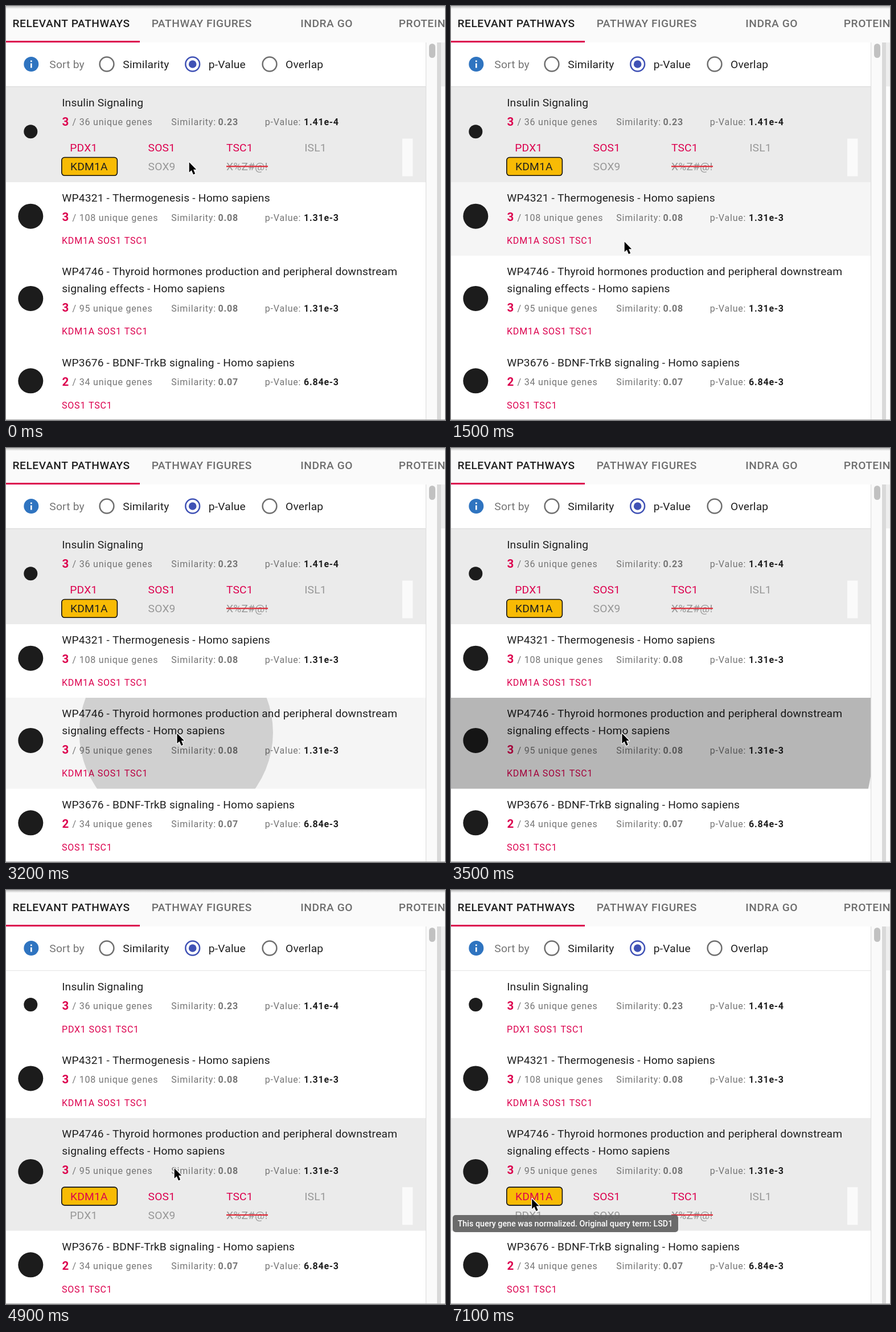
An HTML page with a canvas for the animation above (8 s loop, 771 by 726 pixels).

```html
<!DOCTYPE html>
<html lang="en">
<head>
<meta charset="utf-8">
<title>Relevant pathways</title>
<style>
html, body { margin: 0; width: 100%; height: 100%; overflow: hidden; background: #fff; }
canvas { display: block; }
</style>
</head>
<body>
<canvas id="stage" width="771" height="726"></canvas>
<script>
const ctx = document.getElementById('stage').getContext('2d');
const LOOP = 8000, STEP = 100, SELECT_AT = 3600;
const INK = '#1f1f1f', GREY = '#757575', PALE = '#979797', PINK = '#dc004e', BLUE = '#3f51b5';

const pathways = [
  { title: ['Insulin Signaling'], hits: 3, total: 36, sim: '0.23', p: '1.41e-4',
    genes: 'PDX1 SOS1 TSC1', grid: 'PDX1 SOS1 TSC1 ISL1 KDM1A SOX9 X%Z#@!', chipColor: INK, dot: 12 },
  { title: ['WP4321 - Thermogenesis - Homo sapiens'], hits: 3, total: 108, sim: '0.08', p: '1.31e-3',
    genes: 'KDM1A SOS1 TSC1', dot: 22 },
  { title: ['WP4746 - Thyroid hormones production and peripheral downstream',
            'signaling effects - Homo sapiens'], hits: 3, total: 95, sim: '0.08', p: '1.31e-3',
    genes: 'KDM1A SOS1 TSC1', grid: 'KDM1A SOS1 TSC1 ISL1 PDX1 SOX9 X%Z#@!', chipColor: PINK, dot: 22 },
  { title: ['WP3676 - BDNF-TrkB signaling - Homo sapiens'], hits: 2, total: 34, sim: '0.07', p: '6.84e-3',
    genes: 'SOS1 TSC1', dot: 22 }
];

// time, x, y of the pointer tip
const pointerPath = [
  [1000, 321, 273.5], [1400, 305, 408], [1500, 304, 413], [1700, 304, 425], [2000, 300.5, 490],
  [2100, 300, 498], [2300, 300, 500], [4400, 299.5, 500], [4700, 298, 493], [4800, 298, 493],
  [4900, 295, 487.5], [5100, 269, 472], [5200, 269, 472], [5700, 178, 500], [6100, 130, 521], [6200, 141.5, 541]
];

const clamp = v => Math.min(1, Math.max(0, v));
const ramp = (t, start, length) => clamp((t - start) / length);

// cubic-bezier(.4, 0, .2, 1)
function ease(x) {
  let lo = 0, hi = 1;
  for (let i = 0; i < 20; i++) {
    const s = (lo + hi) / 2, r = 1 - s;
    if (1.2 * r * r * s + 0.6 * r * s * s + s * s * s < x) lo = s; else hi = s;
  }
  return lo * lo * (3 - 2 * lo);
}

function rect(x, y, w, h, color) {
  ctx.fillStyle = color;
  ctx.fillRect(x, y, w, h);
}

function roundRect(x, y, w, h, r, fill, stroke) {
  ctx.beginPath();
  ctx.roundRect(x, y, w, h, r);
  ctx.fillStyle = fill;
  ctx.fill();
  if (stroke) {
    ctx.strokeStyle = stroke;
    ctx.lineWidth = 1.6;
    ctx.stroke();
  }
}

function circle(x, y, r, fill, stroke) {
  ctx.beginPath();
  ctx.arc(x, y, r, 0, Math.PI * 2);
  if (fill) { ctx.fillStyle = fill; ctx.fill(); }
  if (stroke) { ctx.strokeStyle = stroke; ctx.lineWidth = 2.5; ctx.stroke(); }
}

function text(str, x, y, color = INK, size = 19.2, weight = 400, spacing = 0.2) {
  ctx.font = `${weight} ${size}px Roboto, sans-serif`;
  ctx.letterSpacing = spacing + 'px';
  ctx.fillStyle = color;
  ctx.fillText(str, x, y);
}
const small = (str, x, y, color = GREY, weight = 400) => text(str, x, y, color, 16, weight, 0.8);

function drawHeader() {
  rect(0, 0, 771, 64, '#fafafa');
  const shade = ctx.createLinearGradient(0, 0, 0, 5);
  shade.addColorStop(0, '#bdbdbd');
  shade.addColorStop(1, '#fafafa');
  rect(0, 0, 771, 5, shade);
  [['RELEVANT PATHWAYS', 11.5], ['PATHWAY FIGURES', 255.7], ['INDRA GO', 517.3], ['PROTEIN', 689.8]]
    .forEach(([label, x], i) => text(label, x, 37.4, i ? '#6e6e6e' : INK, 19.2, 500, 0.55));
  rect(0, 61, 235, 3, PINK);

  circle(44.3, 102, 13, '#2f74c0');
  rect(43, 100.5, 2.6, 8, '#fff');
  rect(43, 95.5, 2.6, 2.6, '#fff');
  text('Sort by', 76.3, 109, GREY);
  [['Similarity', 177, 205.3], ['p-Value', 327.7, 355.8], ['Overlap', 463, 491]].forEach(([label, x, labelX], i) => {
    circle(x, 102, 12.4, null, i === 1 ? BLUE : '#6f6f6f');
    if (i === 1) circle(x, 102, 6.8, BLUE);
    text(label, labelX, 109);
  });
}

function drawScrollbars() {
  rect(737, 64, 20, 662, '#fafafa');
  rect(737, 64, 1.2, 662, '#dedede');
  roundRect(743, 66, 11, 25, 5.5, '#c1c1c1');
  rect(757, 64, 7, 662, '#d9d9d9');
  rect(764, 64, 7, 77, '#eeeeee');
  rect(764, 141, 7, 585, '#fcfcfc');
  rect(0, 725, 771, 1, '#a6a6a6');
}

function drawGrid(row, y) {
  const hits = row.genes.split(' ');
  row.grid.split(' ').forEach((gene, i) => {
    const x = 112.3 + 137.3 * (i % 4), base = y + 114 + 33 * Math.floor(i / 4);
    if (gene === 'KDM1A') {
      roundRect(97.8, base - 22.8, 97.6, 31.8, 5, '#f8bb05', '#111');
      text(gene, x + 0.7, base, row.chipColor);
    } else {
      text(gene, x, base, hits.includes(gene) ? PINK : PALE);
    }
    if (gene === 'X%Z#@!') rect(387, base - 8.1, 73, 2.2, '#df2b38');
  });
  rect(696, y + 91.2, 18.5, 66, '#fafafa');
}

function drawRow(row, y, h, shade, open) {
  rect(0, y, 737, h, `rgba(0,0,0,${shade})`);
  circle(43.3, y + h / 2 - 4.8, row.dot, '#1c1c1c');
  row.title.forEach((line, i) => text(line, 98.2, y + 34.4 + 30 * i));
  y += 30 * (row.title.length - 1);
  text(row.hits, 98.6, y + 68.4, PINK, 20.5, 700, 0);
  small(`/ ${row.total} unique genes`, 116.5, y + 67.8);
  small('Similarity:', 290.2, y + 67.8);
  small(row.sim, 372.6, y + 67.8, GREY, 700);
  small('p-Value:', 454.8, y + 67.8);
  small(row.p, 523, y + 67.8, INK, 700);
  if (open) drawGrid(row, y);
  else small(row.genes, 98, y + 108.2, PINK);
}

function drawRipple(t, y, h) {
  const grow = ease(ramp(t, 3033, 550));
  const alpha = 0.87 * (0.1 + 0.2 * grow) * (1 - ease(ramp(t, 3550, 550)));
  if (t < 3033 || alpha <= 0) return;
  ctx.save();
  ctx.beginPath();
  ctx.rect(0, y, 737.5, h);
  ctx.clip();
  circle(298.8, y + 61, 451 * grow, `rgba(0,0,0,${alpha})`);
  ctx.restore();
}

function drawTooltip(opacity) {
  if (!opacity) return;
  ctx.save();
  ctx.globalAlpha = opacity;
  roundRect(3, 570, 396, 30, 5, 'rgba(97,97,97,.92)');
  ctx.textAlign = 'center';
  text('This query gene was normalized. Original query term: LSD1', 200.5, 590, '#fff', 14.3, 500, 0);
  ctx.restore();
}

function drawPointer(t) {
  let [, x, y] = pointerPath[0];
  for (let i = 1; i < pointerPath.length; i++) {
    const [t0, x0, y0] = pointerPath[i - 1], [t1, x1, y1] = pointerPath[i];
    if (t >= t0) {
      const k = ramp(t, t0, t1 - t0);
      x = x0 + (x1 - x0) * k;
      y = y0 + (y1 - y0) * k;
    }
  }
  ctx.save();
  ctx.translate(x, y);
  const arrow = new Path2D('M.7 .5V18.2L4.8 14.4L8 22L11.2 20.6L8.1 13.3H13.2Z');
  ctx.lineJoin = 'round';
  ctx.lineWidth = 2.6;
  ctx.strokeStyle = '#fff';
  ctx.stroke(arrow);
  ctx.fillStyle = '#000';
  ctx.fill(arrow);
  ctx.restore();
}

function draw(t) {
  const switched = t >= SELECT_AT, picked = ramp(t, SELECT_AT - 50, 150);
  const tops = switched ? [141.3, 270.5, 399.9, 597.5, 726.8] : [141.3, 309, 437.9, 597.5, 726.8];
  const enterThird = ramp(t, 1760, 150);
  const shades = [
    0.08 * (1 - picked),
    0.04 * (ramp(t, 1105, 150) - enterThird),
    0.04 * (enterThird + picked),
    0
  ];
  rect(0, 0, 771, 726, '#fff');
  drawHeader();
  rect(0, 140.8, 737, 1, '#e2e2e2');
  pathways.forEach((row, i) =>
    drawRow(row, tops[i], tops[i + 1] - tops[i], shades[i], i === (switched ? 2 : 0)));
  drawRipple(t, tops[2], tops[3] - tops[2]);
  drawScrollbars();
  drawTooltip(ease(ramp(t, 6220, 200)));
  drawPointer(t);
}

const start = performance.now();
function tick() {
  const t = (performance.now() - start) % LOOP;
  draw(Math.floor(t / STEP) * STEP);
  requestAnimationFrame(tick);
}
tick();
</script>
</body>
</html>
```
